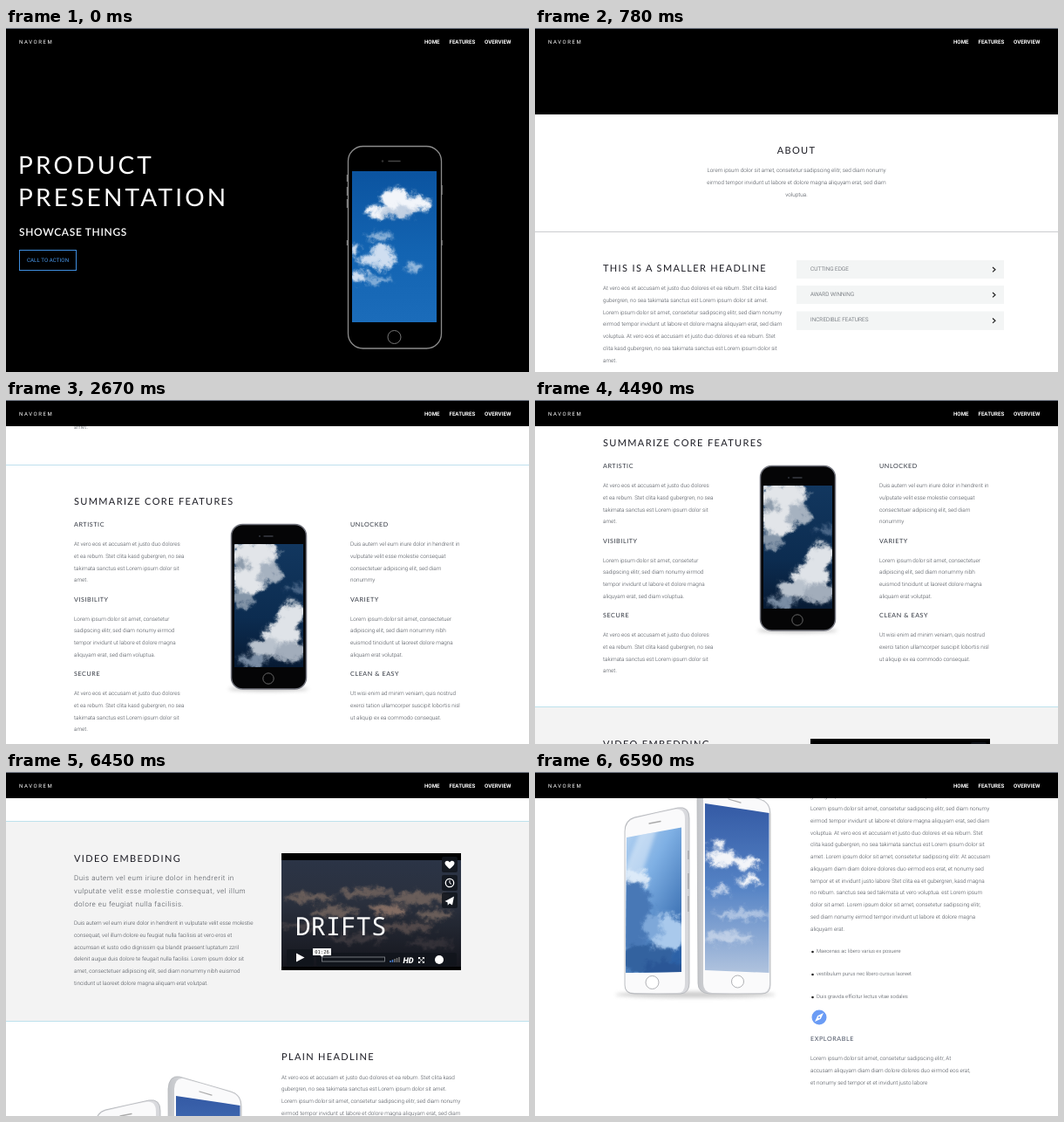
An HTML page that plays this animation: 600 by 394 pixels, repeating every 8 s.

```html
<!DOCTYPE html>
<html lang="en">
<head>
<meta charset="utf-8">
<title>Product presentation</title>
<style>
  html, body { margin: 0; width: 100%; height: 100%; overflow: hidden; background: #fff; }
  #stage { position: relative; width: 600px; height: 394px; overflow: hidden; background: #fff;
    text-rendering: geometricPrecision; }
  #page { position: absolute; left: 0; top: 0; width: 600px; height: 1800px;
    animation: scroll 8s step-end infinite; }

  /* four wheel scrolls, each caught mid-ease twice before it settles */
  @keyframes scroll {
    0%      { transform: translateY(0); }
    6.25%   { transform: translateY(-35px); }
    7.125%  { transform: translateY(-273px); }
    8%      { transform: translateY(-350px); }
    31.625% { transform: translateY(-385px); }
    32.5%   { transform: translateY(-623px); }
    33.375% { transform: translateY(-700px); }
    56.125% { transform: translateY(-767px); }
    57%     { transform: translateY(-999px); }
    57.875% { transform: translateY(-1048px); }
    80.625% { transform: translateY(-1062px); }
    81.5%   { transform: translateY(-1278px); }
    82.375% { transform: translateY(-1397px); }
  }

  section { position: absolute; left: 0; width: 600px; }
  svg.art { position: absolute; left: 0; top: 0; overflow: visible; }
  h1, h2, h3, p, a { position: absolute; margin: 0; white-space: pre; }
  h1, h2, h3 { font-family: Lato, sans-serif; font-weight: 400; line-height: 1.2; color: #1c1c24; }
  h1 { font-size: 28px; letter-spacing: 3.2px; line-height: 37px; color: #fff; }
  h2 { font-size: 11px; letter-spacing: .122em; }
  h3 { font-size: 7.2px; letter-spacing: .08em; color: #30353f; }
  p, a { font: 300 6.36px/13.75px Roboto, sans-serif; color: #454a52; }
  .lead { font-size: 8px; line-height: 14.75px; letter-spacing: .55px; }
  .item { left: 323px; font-size: 5.9px; }
  .mid { left: 0; width: 600px; text-align: center; }

  nav { position: absolute; left: 0; top: 0; width: 600px; height: 30px; box-sizing: border-box;
    background: #000; border-top: 1px solid #737a86; }
  nav a { top: 9px; color: #fff; font-weight: 600; font-size: 6.2px; }
  nav .brand { left: 15px; font-weight: 400; font-size: 6px; letter-spacing: 1.6px; color: #fff; }
  .button { left: 15px; top: 254px; width: 64px; height: 22px; border: 1px solid #3f8fe0;
    color: #4a9bf0; font-size: 6.2px; font-weight: 400; line-height: 23px; letter-spacing: .05px; text-align: center; }
</style>
</head>
<body>
<div id="stage">
<div id="page">

<section style="top:0">
  <svg class="art" width="600" height="449">
    <defs>
      <filter id="puff" x="-40%" y="-60%" width="180%" height="220%" color-interpolation-filters="sRGB">
        <feGaussianBlur in="SourceGraphic" stdDeviation="2.300" result="haze"/>
        <feTurbulence type="fractalNoise" baseFrequency=".09" numOctaves="4" seed="5"/>
        <feDisplacementMap in="haze" scale="17" xChannelSelector="R" yChannelSelector="G"/>
        <feGaussianBlur stdDeviation=".5"/>
      </filter>
      <filter id="soft" x="-30%" y="-200%" width="160%" height="500%"><feGaussianBlur stdDeviation="2"/></filter>
      <linearGradient id="noon" x2="0" y2="1">
        <stop stop-color="#0b54a0"/><stop offset=".55" stop-color="#1364b2"/><stop offset="1" stop-color="#1b6cba"/>
      </linearGradient>
      <linearGradient id="night" x2="0" y2="1">
        <stop stop-color="#12375f"/><stop offset=".6" stop-color="#0c2c50"/><stop offset="1" stop-color="#071a33"/>
      </linearGradient>
      <linearGradient id="dusk" x2="0" y2="1">
        <stop stop-color="#2b3446"/><stop offset=".4" stop-color="#2a303d"/><stop offset="1" stop-color="#15161d"/>
      </linearGradient>
      <linearGradient id="rays" x2=".7" y2="1">
        <stop stop-color="#b5d3f2"/><stop offset=".4" stop-color="#7fb0e4"/><stop offset="1" stop-color="#2c62a8"/>
      </linearGradient>
      <linearGradient id="day" x2="0" y2="1">
        <stop stop-color="#3359a4"/><stop offset=".5" stop-color="#5583c5"/><stop offset="1" stop-color="#b0c3de"/>
      </linearGradient>
      <linearGradient id="steel">
        <stop stop-color="#c2c4c8"/><stop offset=".5" stop-color="#f1f1f3"/><stop offset="1" stop-color="#d5d6da"/>
      </linearGradient>
    </defs>
    <rect width="600" height="449"/>
    <path d="M391.500 168v8M391.500 182v10M391.500 196v10M500 180v11M391.500 243v6M500 243v6" stroke="#777" stroke-width="1.500"/>
    <rect x="392.500" y="135.500" width="107" height="231.500" rx="17" fill="#000" stroke="#8c8c8c" stroke-width="1.300"/>
    <circle cx="432" cy="152.500" r="1.200" fill="#333"/>
    <path d="M439 152.500h13" stroke="#444" stroke-width="1.500" stroke-linecap="round"/>
    <circle cx="445.500" cy="354" r="7.500" fill="none" stroke="#777"/>
    <svg x="397" y="164" width="97" height="173" viewBox="397 164 97 173">
      <rect x="397" y="164" width="97" height="173" fill="url(#noon)"/>
      <g filter="url(#puff)" fill="#f2f5fa">
        <ellipse cx="449" cy="196" rx="18" ry="13"/><ellipse cx="428" cy="210" rx="16" ry="6"/>
        <ellipse cx="472" cy="202" rx="16" ry="8"/><ellipse cx="450" cy="211" rx="22" ry="6" fill="#c2d0e2"/>
      </g>
      <g filter="url(#puff)" fill="#cfdef0">
        <ellipse cx="428" cy="239" rx="15" ry="4" opacity=".7"/><ellipse cx="432" cy="262" rx="15" ry="13"/>
        <ellipse cx="414" cy="266" rx="12" ry="5"/><ellipse cx="399" cy="254" rx="6" ry="6"/>
        <ellipse cx="404" cy="285" rx="11" ry="7"/><ellipse cx="426" cy="289" rx="16" ry="3" opacity=".7"/>
        <ellipse cx="466" cy="274" rx="10" ry="5" opacity=".7"/>
      </g>
    </svg>
  </svg>
  <h1 style="left:14px;top:138px">PRODUCT
PRESENTATION</h1>
  <h3 style="left:15px;top:227px;font-size:12px;font-weight:600;letter-spacing:.65px;color:#fff">SHOWCASE THINGS</h3>
  <a class="button">CALL TO ACTION</a>
</section>

<section style="top:350px">
  <svg class="art" width="600" height="394">
    <path d="M0 233.500h600" stroke="#cbcdcf"/>
    <path d="M300 266h238v21h-238zM300 295h238v21h-238zM300 324.500h238v21.500h-238z" fill="#f3f5f5"/>
    <path d="M525 274l3 2.700-3 2.700M525 303l3 2.700-3 2.700M525 332.500l3 2.700-3 2.700" fill="none" stroke="#222" stroke-width="1.200"/>
  </svg>
  <h2 class="mid" style="top:134px">ABOUT</h2>
  <p class="mid" style="top:157px">Lorem ipsum dolor sit amet, consetetur sadipscing elitr, sed diam nonumy
eirmod tempor invidunt ut labore et dolore magna aliquyam erat, sed diam
voluptua.</p>
  <h2 style="left:78px;top:269px">THIS IS A SMALLER HEADLINE</h2>
  <p style="left:78px;top:292px">At vero eos et accusam et justo duo dolores et ea rebum. Stet clita kasd
gubergren, no sea takimata sanctus est Lorem ipsum dolor sit amet.
Lorem ipsum dolor sit amet, consetetur sadipscing elitr, sed diam nonumy
eirmod tempor invidunt ut labore et dolore magna aliquyam erat, sed diam
voluptua. At vero eos et accusam et justo duo dolores et ea rebum. Stet
clita kasd gubergren, no sea takimata sanctus est Lorem ipsum dolor sit
amet.</p>
  <p style="left:316px;top:270px">CUTTING EDGE</p>
  <p style="left:316px;top:299px">AWARD WINNING</p>
  <p style="left:316px;top:328px">INCREDIBLE FEATURES</p>
</section>

<section style="top:700px">
  <svg class="art" width="600" height="394">
    <path d="M0 74.500h600" stroke="#bfe0ee"/>
    <ellipse cx="301" cy="331" rx="46" ry="2.500" fill="#999" opacity=".6" filter="url(#soft)"/>
    <rect x="258.500" y="142.500" width="86" height="188.500" rx="13" fill="#050506" stroke="#74767f" stroke-width="1.500"/>
    <circle cx="291" cy="156" r="1" fill="#30343c"/>
    <path d="M296 156h10" stroke="#3a3d44" stroke-width="1.300" stroke-linecap="round"/>
    <circle cx="301" cy="319" r="6.200" fill="none" stroke="#666"/>
    <svg x="262" y="165" width="79" height="141" viewBox="262 165 79 141">
      <rect x="262" y="165" width="79" height="141" fill="url(#night)"/>
      <g filter="url(#puff)" fill="#e2e5e9">
        <ellipse cx="284" cy="176" rx="28" ry="16"/><ellipse cx="277" cy="203" rx="20" ry="20"/>
        <ellipse cx="302" cy="198" rx="13" ry="13" fill="#a6b2c0"/><ellipse cx="272" cy="228" rx="12" ry="9" fill="#8596a9"/>
        <ellipse cx="269" cy="188" rx="8" ry="7" fill="#8e9cac"/>
      </g>
      <g filter="url(#puff)" fill="#dfe3e8">
        <ellipse cx="328" cy="246" rx="16" ry="14"/><ellipse cx="318" cy="268" rx="21" ry="16"/>
        <ellipse cx="296" cy="284" rx="18" ry="11" fill="#b9c2cd"/><ellipse cx="326" cy="288" rx="19" ry="12" fill="#a2adbb"/>
        <ellipse cx="283" cy="299" rx="16" ry="6" fill="#7a8da4"/><ellipse cx="332" cy="215" rx="9" ry="5" fill="#4c6889"/>
      </g>
    </svg>
  </svg>
  <h2 style="left:78px;top:110px">SUMMARIZE CORE FEATURES</h2>
  <h3 style="left:78px;top:139px">ARTISTIC</h3>
  <p style="left:78px;top:159px">At vero eos et accusam et justo duo dolores
et ea rebum. Stet clita kasd gubergren, no sea
takimata sanctus est Lorem ipsum dolor sit
amet.</p>
  <h3 style="left:78px;top:225px">VISIBILITY</h3>
  <p style="left:78px;top:244.500px">Lorem ipsum dolor sit amet, consetetur
sadipscing elitr, sed diam nonumy eirmod
tempor invidunt ut labore et dolore magna
aliquyam erat, sed diam voluptua.</p>
  <h3 style="left:78px;top:310px">SECURE</h3>
  <p style="left:78px;top:330px">At vero eos et accusam et justo duo dolores
et ea rebum. Stet clita kasd gubergren, no sea
takimata sanctus est Lorem ipsum dolor sit
amet.</p>
  <h3 style="left:395px;top:139px">UNLOCKED</h3>
  <p style="left:395px;top:159px">Duis autem vel eum iriure dolor in hendrerit in
vulputate velit esse molestie consequat
consectetuer adipiscing elit, sed diam
nonummy</p>
  <h3 style="left:395px;top:225px">VARIETY</h3>
  <p style="left:395px;top:244.500px">Lorem ipsum dolor sit amet, consectetuer
adipiscing elit, sed diam nonummy nibh
euismod tincidunt ut laoreet dolore magna
aliquam erat volutpat.</p>
  <h3 style="left:395px;top:310px">CLEAN &amp; EASY</h3>
  <p style="left:395px;top:330px">Ut wisi enim ad minim veniam, quis nostrud
exerci tation ullamcorper suscipit lobortis nisl
ut aliquip ex ea commodo consequat.</p>
</section>

<section style="top:1048px">
  <svg class="art" width="600" height="394">
    <rect y="71" width="600" height="228" fill="#f3f3f3"/>
    <path d="M0 70.500h600M0 299.500h600" stroke="#bde1ec"/>
    <rect x="316" y="107" width="206" height="134"/>
    <svg x="316" y="115" width="206" height="122" viewBox="316 115 206 122">
      <rect x="316" y="115" width="206" height="122" fill="url(#dusk)"/>
      <g filter="url(#puff)" fill="#75665f" opacity=".85">
        <ellipse cx="350" cy="158" rx="28" ry="5"/><ellipse cx="412" cy="152" rx="32" ry="5"/>
        <ellipse cx="474" cy="158" rx="34" ry="7"/><ellipse cx="376" cy="174" rx="26" ry="6"/>
        <ellipse cx="440" cy="172" rx="22" ry="6" fill="#94796b"/><ellipse cx="492" cy="178" rx="20" ry="6"/>
        <ellipse cx="338" cy="190" rx="20" ry="4" fill="#4d4649"/><ellipse cx="462" cy="192" rx="32" ry="5" fill="#5c504f"/>
        <ellipse cx="402" cy="204" rx="36" ry="4" fill="#423d42"/><ellipse cx="486" cy="211" rx="26" ry="4" fill="#3a363c"/>
      </g>
    </svg>
    <text x="332" y="201" font-family="'Noto Sans Mono', monospace" font-weight="200" font-size="29" fill="#fff">DRIFTS</text>
    <g fill="#11151c" opacity=".85">
      <rect x="500" y="111" width="18" height="18" rx="2"/><rect x="500" y="132" width="18" height="18" rx="2"/>
      <rect x="500" y="152" width="18" height="18" rx="2"/><rect x="322" y="217" width="31" height="19" rx="2"/>
      <rect x="356" y="221" width="161" height="15" rx="2"/>
    </g>
    <g fill="#fff">
      <path d="M509 125c-3-2.500-5.500-4.500-5.500-6.700 0-3 4-3.500 5.500-.9 1.500-2.600 5.500-2.100 5.500.9 0 2.200-2.500 4.200-5.500 6.700z"/>
      <path d="M503.500 162l10.500-5.500-2 10-3.200-2-2 2.200-.3-3.400z"/>
      <path d="M333 221.500l9.500 5-9.500 5z"/>
      <path d="M352 216h21v8h-8.500l-2 2-2-2H352z"/>
      <path d="M473 226h2.800l-2.800 2.800zM480 226v2.800l-2.800-2.800zM473 233v-2.800l2.800 2.800zM480 233h-2.800l2.800-2.800z"/>
      <circle cx="497" cy="229" r="5"/>
      <text x="455.500" y="232.500" font-family="Roboto, sans-serif" font-weight="900" font-style="italic" font-size="9.300">HD</text>
    </g>
    <g fill="none" stroke="#fff">
      <circle cx="509" cy="141" r="4.700" stroke-width="1.300"/><path d="M509 138v3l2 1.500"/>
      <rect x="362.500" y="226" width="72" height="5" stroke="#8b8e94" stroke-width=".8"/>
      <path d="M473.500 226.500l6 6M479.500 226.500l-6 6" stroke-width=".9"/>
      <path d="M441 232v-2M443.500 232v-3" stroke="#4b7fd0" stroke-width="1.500"/>
      <path d="M446 232v-4M448.500 232v-5M451 232v-6" stroke="#777" stroke-width="1.500"/>
    </g>
    <text x="354.300" y="222.200" font-family="'DejaVu Sans Mono', monospace" font-size="5.500" fill="#222">01:26</text>
  </svg>
  <h2 style="left:78px;top:107px">VIDEO EMBEDDING</h2>
  <p class="lead" style="left:78px;top:129px">Duis autem vel eum iriure dolor in hendrerit in
vulputate velit esse molestie consequat, vel illum
dolore eu feugiat nulla facilisis.</p>
  <p style="left:78px;top:181px">Duis autem vel eum iriure dolor in hendrerit in vulputate velit esse molestie
consequat, vel illum dolore eu feugiat nulla facilisis at vero eros et
accumsan et iusto odio dignissim qui blandit praesent luptatum zzril
delenit augue duis dolore te feugait nulla facilisi. Lorem ipsum dolor sit
amet, consectetuer adipiscing elit, sed diam nonummy nibh euismod
tincidunt ut laoreet dolore magna aliquam erat volutpat.</p>
</section>

<section style="top:1397px">
  <svg class="art" width="600" height="394">
    <clipPath id="front"><path d="M105 75L168 63.500V229L104 230z"/></clipPath>
    <clipPath id="back"><path d="M195 36L268.500 47V230L195 227z"/></clipPath>
    <ellipse cx="184" cy="255" rx="92" ry="3.500" fill="#aaa" opacity=".6" filter="url(#soft)"/>

    <path d="M186 28Q187 12 199 14L258 31Q270 34 270 48V244Q270 254 260 254H200Q187 253 187 242z" fill="url(#steel)" stroke="#b4b6ba" stroke-width=".8"/>
    <path d="M193 28Q194 15 203 16L258 32Q269 35 269 48V243Q269 253 259 253H203Q193 252 193 242z" fill="#fafafb"/>
    <path d="M222 31l14 4" stroke="#aaa" stroke-width="1.300" stroke-linecap="round"/>
    <g clip-path="url(#back)">
      <path d="M195 34h74v196h-74z" fill="url(#day)"/>
      <g filter="url(#puff)" fill="#f3f5f9">
        <ellipse cx="216" cy="99" rx="17" ry="9"/><ellipse cx="244" cy="104" rx="15" ry="7"/>
        <ellipse cx="209" cy="83" rx="8" ry="5"/><ellipse cx="246" cy="124" rx="13" ry="5"/>
        <ellipse cx="212" cy="136" rx="12" ry="4" opacity=".7"/><ellipse cx="238" cy="163" rx="32" ry="4" opacity=".5"/>
        <ellipse cx="222" cy="190" rx="30" ry="6" opacity=".5"/>
      </g>
    </g>
    <circle cx="232.500" cy="240" r="7" fill="#fff" stroke="#a7a9ad" stroke-width=".9"/>

    <path d="M103 68Q103 55 114 52L164 41Q177 39 177 53V242Q177 253 167 254H114Q103 254 103 244z" fill="url(#steel)" stroke="#aeb0b5" stroke-width=".8"/>
    <path d="M103.500 68Q104 56 114 53L160 43Q172 41 172 54V243Q172 253 163 253H114Q103.500 253 103.500 244z" fill="#fafafb"/>
    <path d="M131 59l13-2.500" stroke="#aaa" stroke-width="1.300" stroke-linecap="round"/>
    <path d="M176 90v10M176 116v18M176 142v18" stroke="#8f9196"/>
    <g clip-path="url(#front)">
      <path d="M104 63h65v168h-65z" fill="url(#rays)"/>
      <path d="M104 110L122 65H140L118 130z" fill="#fff" opacity=".4" filter="url(#soft)"/>
      <g filter="url(#puff)">
        <ellipse cx="116" cy="122" rx="16" ry="10" fill="#dceaf8"/><ellipse cx="152" cy="184" rx="22" ry="20" fill="#a9c9ec"/>
        <ellipse cx="113" cy="164" rx="22" ry="38" fill="#4878b6"/><ellipse cx="134" cy="178" rx="10" ry="16" fill="#7ea8d9"/>
        <ellipse cx="126" cy="214" rx="34" ry="16" fill="#33629f"/><ellipse cx="150" cy="226" rx="26" ry="10" fill="#2a5696"/>
      </g>
    </g>
    <circle cx="134.500" cy="241" r="7.500" fill="#fff" stroke="#a7a9ad" stroke-width=".9"/>

    <g fill="#222"><circle cx="318.500" cy="206" r="1.300"/><circle cx="318.500" cy="232" r="1.300"/><circle cx="318.500" cy="258" r="1.300"/></g>
    <circle cx="326" cy="281" r="8.500" fill="#6b9cf5"/>
    <path d="M331 276l-3.200 6.800-6.800 3.200 3.200-6.800z" fill="#fff"/>
    <circle cx="326" cy="281" r="1" fill="#6b9cf5"/>
  </svg>
  <h2 style="left:316px;top:-15px">PLAIN HEADLINE</h2>
  <p style="left:316px;top:8.500px">At vero eos et accusam et justo duo dolores et ea rebum. Stet clita kasd
gubergren, no sea takimata sanctus est Lorem ipsum dolor sit amet.
Lorem ipsum dolor sit amet, consetetur sadipscing elitr, sed diam nonumy
eirmod tempor invidunt ut labore et dolore magna aliquyam erat, sed diam
voluptua. At vero eos et accusam et justo duo dolores et ea rebum. Stet
clita kasd gubergren, no sea takimata sanctus est Lorem ipsum dolor sit
amet. Lorem ipsum dolor sit amet, consetetur sadipscing elitr. At accusam
aliquyam diam diam dolore dolores duo eirmod eos erat, et nonumy sed
tempor et et invidunt justo labore Stet clita ea et gubergren, kasd magna
no rebum. sanctus sea sed takimata ut vero voluptua. est Lorem ipsum
dolor sit amet. Lorem ipsum dolor sit amet, consetetur sadipscing elitr,
sed diam nonumy eirmod tempor invidunt ut labore et dolore magna
aliquyam erat.</p>
  <p class="item" style="top:200px">Maecenas ac libero varius ex posuere</p>
  <p class="item" style="top:226px">vestibulum purus nec libero cursus laoreet</p>
  <p class="item" style="top:252px">Duis gravida efficitur lectus vitae sodales</p>
  <h3 style="left:316px;top:302px;color:#4a5263">EXPLORABLE</h3>
  <p style="left:316px;top:322px">Lorem ipsum dolor sit amet, consetetur sadipscing elitr, At
accusam aliquyam diam diam dolore dolores duo eirmod eos erat,
et nonumy sed tempor et et invidunt justo labore</p>
</section>

</div>
<nav>
  <a class="brand">NAVOREM</a>
  <a style="left:480px">HOME</a>
  <a style="left:508.500px">FEATURES</a>
  <a style="left:549px">OVERVIEW</a>
</nav>
</div>
</body>
</html>
```
